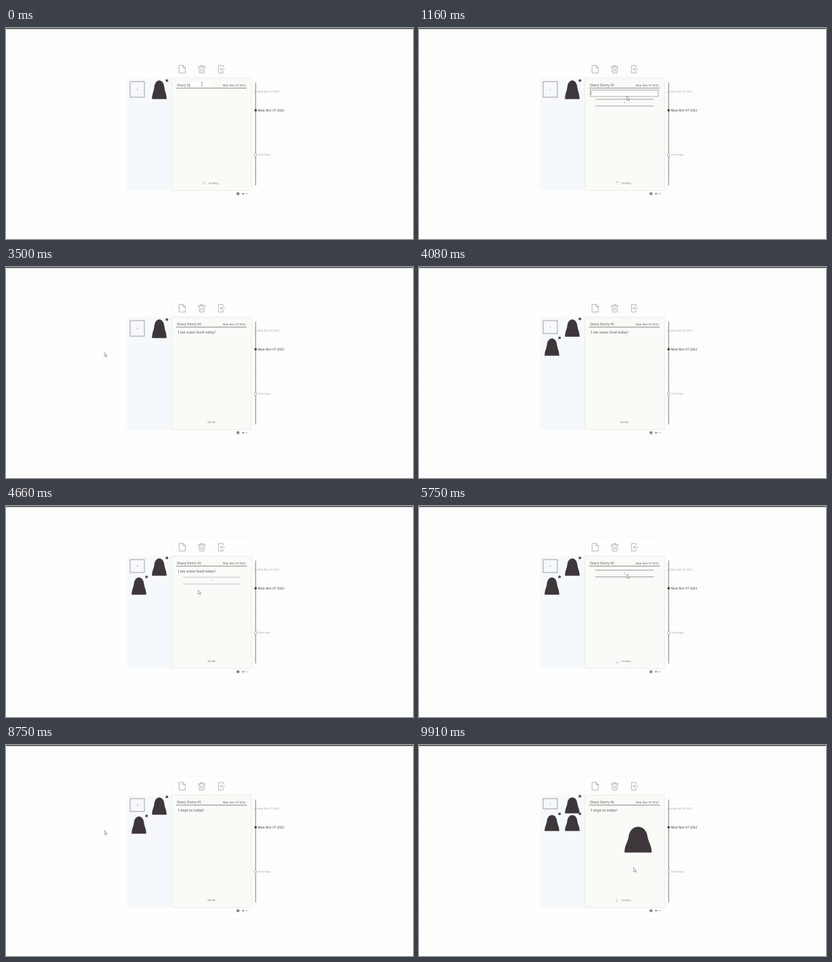
Animation, 600 px wide and 311 px high, one loop 10 s. Source, as an HTML page:

```html
<!DOCTYPE html>
<html lang="en">
<head>
<meta charset="utf-8">
<title>Diary</title>
<style>
  html, body { margin: 0; width: 100%; height: 100%; overflow: hidden; background: #fefefe; }
  svg { display: block; width: 100%; height: 100%; }
  text { font-family: "Noto Serif", "Liberation Serif", serif; fill: #505050; text-rendering: geometricPrecision; white-space: pre; }
  .soft { fill: #a0a0a0; }
  .strong { fill: #2a2a2a; }
  .icon { fill: none; stroke: #777; stroke-width: .55; stroke-linejoin: round; stroke-linecap: round; }
  .page { fill: #fafaf7; filter: drop-shadow(0 .5px 1px rgba(0, 0, 0, .16)); }
</style>
</head>
<body>
<svg viewBox="0 0 600 311" preserveAspectRatio="none">
  <defs>
    <pattern id="paper" width="600" height="8" patternUnits="userSpaceOnUse">
      <rect width="600" height="8" fill="#fefefe"/>
      <rect y="7" width="600" height="1" fill="#fbfbfb"/>
    </pattern>
    <path id="blob" d="M0 1C0 .72 .1 .65 .15 .4C.2 -.13 .8 -.13 .85 .4C.9 .65 1 .72 1 1Z" fill="#3d363a"/>
    <path id="plus" d="M-1 0H1M0 -1V1" stroke="#999" stroke-width=".5"/>
  </defs>

  <rect width="600" height="311" fill="url(#paper)"/>
  <rect width="600" height="1.4" fill="#3c3c3c"/>

  <rect id="toolbar" x="245" y="46.5" width="116" height="28" fill="#fefefe" stroke="#f8f8f8" stroke-width=".8"/>
  <rect x="178" y="74" width="66.5" height="165.5" fill="#f6f9fb"/>
  <rect class="page" x="245" y="74.5" width="116.5" height="164.5"/>

  <g class="icon">
    <path d="M255.5 55.2H261L264.3 58.5V66.3H255.5ZM261 55.2V58.5H264.3"/>
    <path id="trash" d="M283.2 57.3H293.8M286.7 57V55.3H290.3V57M284.5 57.5L285.2 66.3H291.8L292.5 57.5M287.2 60V64M289.8 60V64"/>
    <path d="M320 58V55.3H313.3V66.3H320V63.5M322.5 60.8H316.2M318 59L316.2 60.8L318 62.6"/>
  </g>

  <g id="tile">
    <rect id="tileBox" x="183" y="79" width="21" fill="none" stroke="#777" stroke-width=".7"/>
    <use id="tilePlus" href="#plus"/>
  </g>
  <g id="stickers"></g>

  <rect id="titleField" x="251.5" y="80" width="49.5" height="8" fill="#fff"/>
  <text id="title" x="252" y="86.3" font-size="5.2"></text>
  <text x="319.6" y="86.3" font-size="4.1">Mon Nov 07 2022</text>
  <path d="M250.5 88.6H355" stroke="#666" stroke-width=".75"/>

  <g id="addRow" stroke="#777" stroke-width=".7">
    <path d="M-43 -5H43M-43 5H43"/>
    <use href="#plus"/>
  </g>
  <rect id="field" x="252.5" y="91.6" width="100.3" height="9.3" fill="#fff" stroke="#8a8a8a" stroke-width=".7"/>
  <text id="entry" x="253.4" y="97.6" font-size="5.3"></text>
  <path id="caret" stroke="#444" stroke-width=".5"/>

  <g id="saving">
    <circle cx="293" cy="229" r="2.4" fill="none" stroke="#e2e2e2" stroke-width=".5"/>
    <path id="arc" d="M293 226.6A2.4 2.4 0 0 0 291 230.4" fill="none" stroke="#999" stroke-width=".6"/>
    <text x="298.6" y="230.3" font-size="4.1" fill-opacity=".75">Saving...</text>
  </g>
  <text id="saved" x="296.9" y="230.3" font-size="4" fill-opacity=".8">Saved</text>

  <path d="M368 80.5V232" stroke="#777" stroke-width="1"/>
  <circle cx="368" cy="94" r="1.5" fill="#b0b0b0"/>
  <circle cx="368" cy="121.2" r="1.7" fill="#333"/>
  <circle cx="368" cy="187" r="2.1" fill="#fff" stroke="#999" stroke-width=".7"/>
  <text class="soft" x="371" y="95.3" font-size="3.88">Mon Nov 07 2022</text>
  <text class="strong" x="371.3" y="122.8" font-size="4.73">Mon Nov 07 2022</text>
  <text class="soft" x="372" y="188.2" font-size="3.85">New Page</text>

  <circle cx="342" cy="244.2" r="2.2" fill="#888"/>
  <circle cx="349.4" cy="244.2" r="1.3" fill="#888"/>
  <text class="soft" x="351.6" y="245.2" font-size="2.9">Tips</text>

  <g id="pointer" stroke="#555" stroke-width=".5">
    <path id="arrow" d="M0 0V5.8L1.4 4.6L2.4 6.9L3.4 6.4L2.4 4.3H4.2Z" fill="#fff"/>
    <path id="beam" d="M-1 0H1M0 0V6M-1 6H1"/>
  </g>
</svg>
<script>
const LOOP = 10000;
const TRAVEL = 450;
const $ = id => document.getElementById(id);
const show = (id, on) => $(id).setAttribute('visibility', on ? 'visible' : 'hidden');
const within = (v, a, b) => v >= a && v < b;
const clamp = v => Math.min(1, Math.max(0, v));
const ease = v => v * v * (3 - 2 * v);

const SPOTS = {
  title: [289, 80], row: [306.5, 100.5], margin: [251, 112.5], rest: [317, 159], drop: [316.5, 181],
  tile: [192, 88], desk: [145, 126], shelf: [190, 110], page: [310, 140], newest: [224, 88], trash: [287, 60]
};

// arrival time and place of each pointer move
const MOVES = [
  [0, 'title'], [950, 'row'], [2000, 'rest'], [2800, 'tile'], [3490, 'desk'], [3980, 'shelf'],
  [4550, 'page'], [4850, 'newest'], [5600, 'trash'], [5750, 'row'], [7410, 'margin'],
  [7700, 'tile'], [8740, 'desk'], [9150, 'shelf'], [9450, 'newest'], [9900, 'drop']
];
const ENTRIES = [
  { text: 'I ate some food today!', open: 1050, from: 1130, full: 2200, blur: 2800, clear: 5600 },
  { text: 'I slept in today!', open: 6330, from: 6420, full: 7440, blur: 7880, clear: LOOP }
];
const SAVES = [[0, 2900], [4850, 5160], [5410, 8250], [9450, LOOP]];

function pointerAt(t) {
  const last = MOVES.findLastIndex(([time]) => time <= t);
  const [left, from] = MOVES[last];
  const [arrive, to] = MOVES[last + 1] || [LOOP, from];
  const k = ease(clamp(1 - (arrive - t) / Math.min(TRAVEL, arrive - left)));
  const [x, y] = SPOTS[from].map((v, i) => v + (SPOTS[to][i] - v) * k);
  const choosing = to === 'desk' && t > left + 400;
  const dropping = from === 'shelf' && k === 0;
  return { x, y, from, away: choosing || dropping };
}

// two-column shelf: the add tile comes first, rows tighten as stickers are added
function drawStickers(t, placed) {
  const count = 1 + MOVES.filter(([time, spot]) => spot === 'shelf' && time <= t).length;
  const rowHeight = 32 - 2 * count;
  const tileHeight = 27 - 4 * count;
  const blob = (x, y, w, h) => `<use href="#blob" transform="translate(${x - w / 2} ${y - h / 2}) scale(${w} ${h})"/>`;
  let shapes = placed ? blob(323, 139.5, 40, 38) : '';
  for (let i = 1; i <= count; i++) {
    const x = 196 + 30 * (i % 2);
    const y = 76 + rowHeight * (Math.floor(i / 2) + .5);
    shapes += blob(x, y, 21.5, rowHeight - 2.5) + `<circle cx="${x + 11.2}" cy="${y - 13.5}" r="2" fill="#555"/>`;
  }
  $('stickers').innerHTML = shapes;
  $('tileBox').setAttribute('height', tileHeight);
  $('tilePlus').setAttribute('transform', `translate(193.5 ${79 + tileHeight / 2})`);
  return tileHeight;
}

function drawText(t, entry, editing) {
  const naming = t < 820;
  $('title').textContent = 'Diary Entry #2'.slice(0, 7 + Math.floor(t / 100));
  show('titleField', naming);

  const progress = entry ? clamp((t - entry.from) / (entry.full - entry.from)) : 0;
  $('entry').textContent = entry ? entry.text.slice(0, Math.floor(progress * entry.text.length)) : '';
  show('field', editing);

  // solid while a word is being written, then blinking
  show('caret', naming || editing && t % 1000 < 400);
  const line = $(naming ? 'title' : 'entry');
  const x = +line.getAttribute('x') + line.getComputedTextLength() + .4;
  $('caret').setAttribute('d', `M${x} ${line.getAttribute('y') - 4.8}v6`);
}

// the row for a new line fades in as the pointer comes near
function drawAddRow({ x, y }, entry) {
  const centre = entry ? 110 : 99.5;
  const near = clamp((x - 248) / 12) * clamp((19 - Math.abs(y - centre)) / 8);
  $('addRow').setAttribute('transform', `translate(303 ${centre}) scale(${.94 + .06 * near} 1)`);
  $('addRow').setAttribute('opacity', near);
}

function zoom(id, on, x, y) {
  $(id).setAttribute('transform', on ? `translate(${x} ${y}) scale(1.1) translate(${-x} ${-y})` : '');
}

function render(t) {
  const pointer = pointerAt(t);
  const { x, y, from, away } = pointer;
  const entry = ENTRIES.find(e => within(t, e.open, e.clear));
  const tileHeight = drawStickers(t, from === 'newest' || from === 'drop');
  drawText(t, entry, entry && t < entry.blur);
  drawAddRow(pointer, entry);

  const overTitle = within(y, 78, 85) && x > 250;
  $('pointer').setAttribute('transform', `translate(${x} ${y})`);
  $('arrow').setAttribute('display', away || overTitle ? 'none' : 'inline');
  $('beam').setAttribute('display', overTitle ? 'inline' : 'none');
  zoom('tile', !away && within(x, 183, 204) && within(y, 79, 79 + tileHeight), 193.5, 79 + tileHeight / 2);
  zoom('trash', within(x, 283, 294) && within(y, 54, 67), 288.5, 61);

  const saving = SAVES.some(([a, b]) => within(t, a, b));
  show('saving', saving);
  show('saved', !saving);
  $('arc').setAttribute('transform', `rotate(${t * .36} 293 229)`);
  show('toolbar', t >= 3490);
}

const start = performance.now();
function tick() {
  render((performance.now() - start) % LOOP);
  requestAnimationFrame(tick);
}
tick();
</script>
</body>
</html>
```
